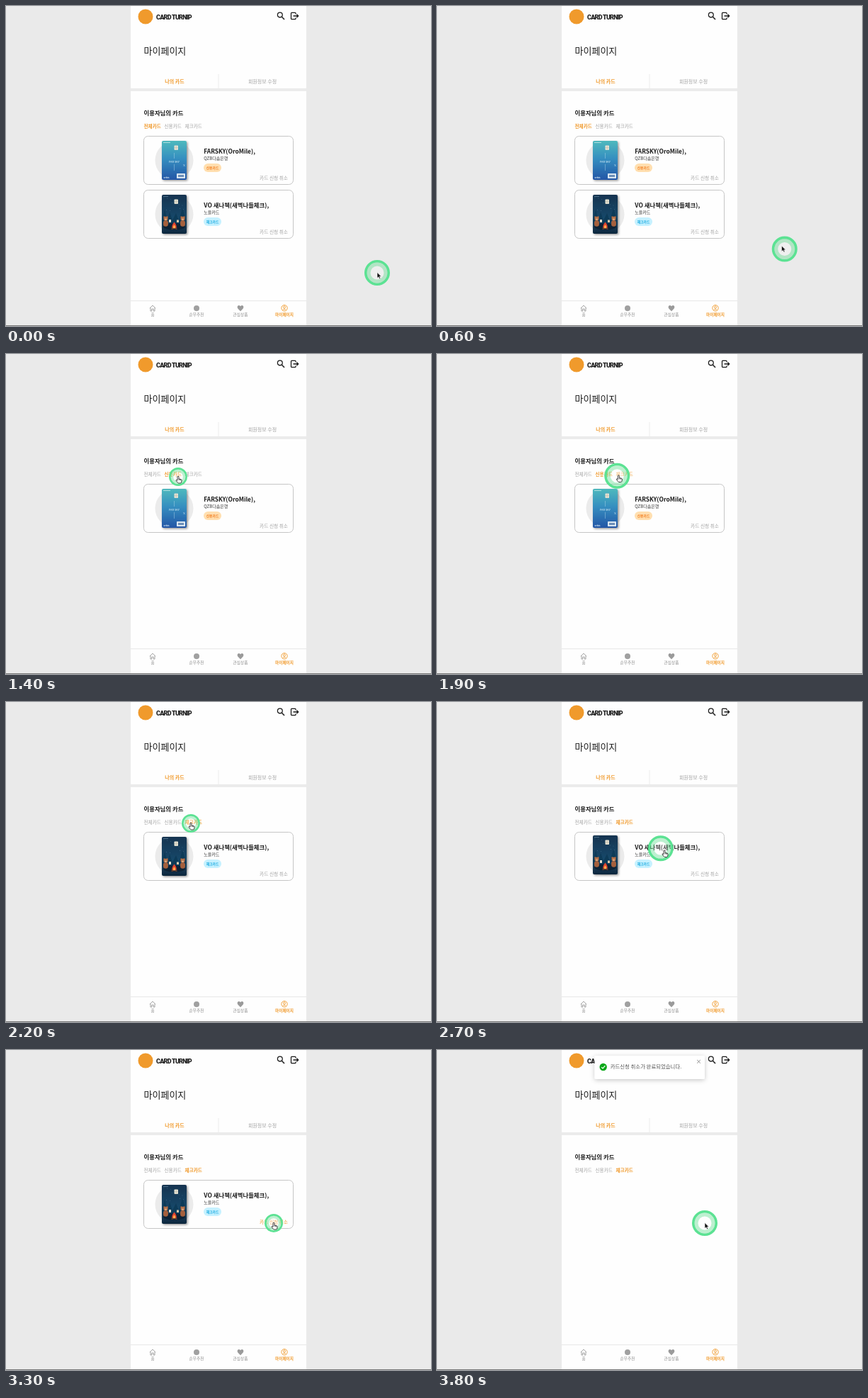
Animation of 600 by 451 pixels, one loop 4000 ms. Source, as an HTML page:

```html
<!DOCTYPE html>
<html>
<head>
<meta charset="utf-8">
<title>마이페이지</title>
<style>
html, body { margin: 0; width: 100%; height: 100%; overflow: hidden; background: #eaeaea; }
svg { display: block; width: 600px; height: 451px; }
text { font-family: "Noto Sans CJK KR", "Noto Sans CJK JP", "Noto Sans CJK", sans-serif; }
</style>
</head>
<body>
<svg id="stage" viewBox="0 0 600 451"></svg>
<script>
const ORANGE = '#f09a2c', GREY = '#a3a3a3', INK = '#1b1b1b';
const LOOP = 4000, STEP = 100;
const FILTER_AT = [1400, 2200], CANCEL_AT = 3600;
const PRESSES = [1350, 2150, 3290];

const text = (x, y, size, fill, str, attrs = '') =>
  `<text x="${x}" y="${y}" font-size="${size}" fill="${fill}" ${attrs}>${str}</text>`;
const rect = (x, y, w, h, fill, attrs = '') =>
  `<rect x="${x}" y="${y}" width="${w}" height="${h}" fill="${fill}" ${attrs}/>`;
const circle = (x, y, r, fill, attrs = '') =>
  `<circle cx="${x}" cy="${y}" r="${r}" fill="${fill}" ${attrs}/>`;
const line = (d, color, width, attrs = '') =>
  `<path d="${d}" fill="none" stroke="${color}" stroke-width="${width}" ${attrs}/>`;
const MID = 'text-anchor="middle"', BOLD = 'font-weight="700"', MEDIUM = 'font-weight="500"';

const defs = `<defs>
  <linearGradient id="sea" x2="0" y2="1">
    <stop offset="0" stop-color="#4fb9bd"/><stop offset=".45" stop-color="#358fc0"/>
    <stop offset="1" stop-color="#2456a6"/>
  </linearGradient>
  <linearGradient id="night" x2="0" y2="1">
    <stop offset="0" stop-color="#143450"/><stop offset=".6" stop-color="#17486a"/>
    <stop offset="1" stop-color="#10273d"/>
  </linearGradient>
  <filter id="drop" x="-30%" y="-30%" width="160%" height="170%">
    <feDropShadow dx="1.5" dy="1.5" stdDeviation="1.6" flood-opacity=".4"/>
  </filter>
  <filter id="soft" x="-10%" y="-30%" width="120%" height="170%">
    <feDropShadow dx="0" dy="1.5" stdDeviation="3" flood-opacity=".22"/>
  </filter>
</defs>`;

const header = rect(0, 0, 600, 451, '#eaeaea') + rect(176, 0, 248, 451, '#fefefe') +
  circle(197, 15, 10.5, ORANGE) +
  text(212, 19, 9, INK, 'CARD TURNIP',
    'font-weight="800" letter-spacing="-.75" style="font-family:Roboto,sans-serif"') +
  circle(386.8, 12.6, 3.4, 'none', `stroke="${INK}" stroke-width="1.3"`) +
  line('M389.3 15.2L393 19', INK, 1.5) +
  line('M409 11.5V10.3Q409 9.3 408 9.3H403.5Q402.5 9.3 402.5 10.3V17.7Q402.5 18.7 403.5 18.7H408Q409 18.7 409 17.7V16.5', INK, 1.3) +
  line('M405.5 14H412.5M410.4 11.7L412.7 14L410.4 16.3', INK, 1.3) +
  text(194.5, 68, 13, INK, '마이페이지', 'font-weight="300"') +
  text(238, 108.5, 7, ORANGE, '나의 카드', `${MID} ${BOLD}`) +
  text(362, 108.5, 7, GREY, '회원정보 수정', `${MID} ${MEDIUM}`) +
  rect(299.5, 96, 1, 20, '#ececec') + rect(176, 116, 248, 4, '#ebebeb') +
  text(194.5, 153.6, 8.4, INK, '이용자님의 카드', BOLD);

const navLabel = (x, str, fill = '#8d8d8d', w = MEDIUM) =>
  text(x, 437.3, 5.65, fill, str, `${MID} ${w}`);
const nav = rect(176, 415, 248, 1, '#e8e8e8') +
  line('M202.8 426L207 422L211.2 426M204 425.2V430H205.8V427H208.2V430H210V425.2', '#9a9a9a', .9) +
  circle(269, 426, 4, '#a0a0a0') +
  `<path d="M331 430.3L327.4 426.5C325 423.3 329 420.3 331 423.3C333 420.3 337 423.3 334.6 426.5Z" fill="#9a9a9a"/>` +
  circle(393, 425.7, 4.2, 'none', `stroke="${ORANGE}" stroke-width=".9"`) +
  circle(393, 424.5, 1.5, 'none', `stroke="${ORANGE}" stroke-width=".9"`) +
  line('M390.3 428.7Q393 425.6 395.7 428.7', ORANGE, .9) +
  navLabel(207, '홈') + navLabel(269, '순무추천') + navLabel(331, '관심상품') +
  navLabel(393, '마이페이지', ORANGE, BOLD) +
  rect(0, 450, 600, 1, '#777');

const chip = rect(17.5, 6.5, 5.5, 6.5, '#e6e3d4', 'rx="1"') +
  line('M17.5 9.7H23M20.2 6.5V13', '#a9a894', .4);
const seaArt = rect(0, 0, 35, 55, 'url(#sea)', 'rx="2"') + chip +
  rect(2, 2, 10, 1, '#d5f0ee', 'opacity=".7"') +
  line('M17.5 17V25M17.5 33V42', '#bfe1ef', .4) +
  text(17.5, 31, 4, '#e4f5fb', 'FAR SKY', MID) +
  text(2.5, 53, 3.2, '#e4f5fb', 'orbis', BOLD) +
  rect(21, 46, 12, 7, '#d9e6f1', 'rx=".6"') + rect(23, 48, 8, 3, '#6d8fb9') +
  line('M30 33L33 36M30.5 36L32.5 33', '#bfe1ef', .5);

const bear = x => circle(x - 2, 31.5, 1.2, '#a8643f') + circle(x + 2, 31.5, 1.2, '#a8643f') +
  circle(x, 33.7, 3, '#b5714a') + circle(x, 34.8, 1.2, '#dfb48c') +
  rect(x - 3.4, 36.3, 6.8, 8.5, '#a5603d', 'rx="3"');
const star = i => circle(3 + (i * 11.3) % 29, 4 + (i * 7.7) % 22, .3, '#9cc0d6');
const nightArt = rect(0, 0, 35, 55, 'url(#night)', 'rx="2"') +
  [...Array(12).keys()].map(star).join('') +
  `<path d="M0 35L4 20L8 35L11 24L15 36L20 26L24 36L29 19L35 36V43H0Z" fill="#113a58"/>` +
  `<ellipse cx="17.5" cy="45" rx="15.5" ry="4.5" fill="#0c2034"/>` + chip +
  rect(2, 2, 7, .8, '#8fb0c6', 'opacity=".6"') + bear(5.5) + bear(29.5) +
  rect(10, 35, 3, 4, '#e9dfd0') + rect(21, 35.5, 3, 3.5, '#d9c7a9') +
  `<path d="M14.5 47Q13.5 43 17.5 38.5Q21.5 43 20.5 47Z" fill="#e2442f"/>` +
  `<path d="M16 47Q15.5 44.5 17.5 42.3Q19.5 44.5 19 47Z" fill="#ffb04a"/>` +
  line('M13.5 48.5L21.5 46.8M13.5 46.8L21.5 48.5', '#7a4a32', 1);

const CARDS = [
  { art: seaArt, name: 'FARSKY(OroMile),', bank: 'QZB다솜은행', kind: '신용카드', back: '#ffdfb0', ink: '#f27a1a' },
  { art: nightArt, name: 'VO 새나첵(새벽나들체크),', bank: '노을카드', kind: '체크카드', back: '#c6f1ff', ink: '#17a9e0' }
];

function card(c, dy, lift, hot) {
  return `<g transform="translate(0 ${dy})">` +
    rect(194.5, 183.5, 211, 68, '#fefefe', 'rx="6" stroke="#c6c6c6"') +
    circle(237.5, 217.5, 27, '#ebebeb') +
    `<g transform="translate(220 ${190 - lift})" filter="url(#drop)">${c.art}</g>` +
    text(279.3, 207.5, 8.4, INK, c.name, BOLD) +
    text(279.3, 217.2, 6, '#333', c.bank, MEDIUM) +
    rect(279, 222, 25, 12, c.back, 'rx="6"') +
    text(291.5, 229.8, 4.8, c.ink, c.kind, `${MID} ${BOLD}`) +
    text(398, 245, 6.7, hot ? ORANGE : GREY, '카드 신청 취소', 'text-anchor="end"') + '</g>';
}

const TABS = [['전체카드', 194.5], ['신용카드', 223.5], ['체크카드', 252.5]];
const filters = (active, hover) => TABS.map(([s, x], i) =>
  text(x, 172, 6.6, i === active || i === hover ? ORANGE : GREY, s,
    i === active ? BOLD : MEDIUM)).join('');

const toast = alpha => `<g opacity="${alpha}">` +
  rect(222.5, 8, 155.5, 33, '#fff', 'rx="2" filter="url(#soft)"') +
  circle(234.7, 24, 5.2, '#0ba81a') + line('M232.2 24.2L234.1 26L237.4 22.2', '#fff', 1.2) +
  text(244.7, 26.4, 7.4, '#555', '카드신청 취소가 완료되었습니다.') +
  line('M367.2 14L371.8 18.6M371.8 14L367.2 18.6', '#8b8b8b', 1) + '</g>';

// Pointer keys: time, x, y
const PATH = [
  [0, 524, 375.5], [300, 519, 371], [600, 486.5, 338], [900, 352, 236], [1200, 243, 172.5],
  [1700, 243, 172.5], [2000, 261, 170.5], [2400, 261, 170.5], [2700, 321, 209],
  [3000, 378, 243.5], [4000, 378, 243.5]
];

// Monotone cubic through the pointer keys
function along(t, k) {
  t = Math.max(0, t);
  let i = 0;
  while (i < PATH.length - 2 && t >= PATH[i + 1][0]) i++;
  const slope = j => PATH[j] && PATH[j + 1]
    ? (PATH[j + 1][k] - PATH[j][k]) / (PATH[j + 1][0] - PATH[j][0]) : 0;
  const tangent = j => {
    const a = slope(j - 1), b = slope(j);
    return a * b > 0 ? 2 * a * b / (a + b) : 0;
  };
  const h = PATH[i + 1][0] - PATH[i][0], u = (t - PATH[i][0]) / h, v = 1 - u;
  return PATH[i][k] * (1 + 2 * u) * v * v + PATH[i + 1][k] * u * u * (3 - 2 * u) +
    h * (tangent(i) * u * v * v - tangent(i + 1) * u * u * v);
}

const ARROW = '<path d="M0 0V8L1.9 6.3L3.2 9.1L4.6 8.5L3.4 5.8H5.8Z" fill="#111" stroke="#fff" stroke-width=".6"/>';
const HAND = '<path d="M-1 .8a1 1 0 0 1 2 0V3.6L4 4.2Q5.3 4.6 5.1 6L4.5 8.6Q4.2 9.5 3.3 9.5H.5Q-.1 9.5-.5 8.9L-2.9 6Q-3.3 5-2.4 4.9Q-1.8 4.9-1 5.8Z" fill="#fff" stroke="#111" stroke-width=".8"/>' +
  line('M1 3.6V5.5M2.4 4V5.7M3.7 4.3V5.9', '#111', .5);

function pointer(t, x, y, hand) {
  const near = Math.min(...PRESSES.map(p => Math.abs(t - p)));
  const scale = .72 + .28 * Math.min(1, Math.max(0, (near - 50) / 100));
  const rx = along(t - 25, 1), ry = along(t - 25, 2) + .5;
  return `<g transform="translate(${rx} ${ry}) scale(${scale})">` +
    circle(0, 0, 9.5, '#fff', 'opacity=".25"') +
    circle(0, 0, 12, 'none', 'stroke="#6fe09a" stroke-width="5" opacity=".45"') +
    circle(0, 0, 16.2, 'none', 'stroke="#5ce293" stroke-width="3.6"') + '</g>' +
    `<g transform="translate(${x} ${y})">${hand ? HAND : ARROW}</g>`;
}

const bump = (t, from, to) =>
  t > from && t < to ? Math.sin(Math.PI * (t - from) / (to - from)) : 0;

function draw(now) {
  const t = Math.min(3800, Math.floor(now % LOOP / STEP) * STEP);
  const x = along(t, 1), y = along(t, 2);
  const active = FILTER_AT.filter(f => t >= f).length;
  const shown = t >= CANCEL_AT ? [] : active ? [CARDS[active - 1]] : CARDS;

  const onRow = y > 163 && y < 177 && x > 194 && x < 277;
  const hover = onRow ? TABS.findIndex(tab => x >= tab[1] && x < tab[1] + 25) : -1;
  const onCard = x > 194 && x < 406 && (y > 183 && y < 252 || !active && y > 259 && y < 328);
  const hot = x > 357 && x < 399 && y > 238 && y < 249 && active > 0;
  const lift = 2 * bump(t, 2500, 2900);

  stage.innerHTML = defs + header + filters(active, hover) +
    shown.map((c, i) => card(c, i * 76, i ? 0 : lift, hot && !i)).join('') + nav +
    (t >= CANCEL_AT ? toast(Math.min(1, .3 + (t - CANCEL_AT) / 200)) : '') +
    pointer(t, x, y, (onCard || hover >= 0) && t < CANCEL_AT + STEP);
}

const stage = document.getElementById('stage');
const start = performance.now();
let last = -1;
function tick() {
  const now = performance.now() - start, step = Math.floor(now / STEP);
  if (step !== last) draw(now);
  last = step;
  requestAnimationFrame(tick);
}
tick();
</script>
</body>
</html>
```
